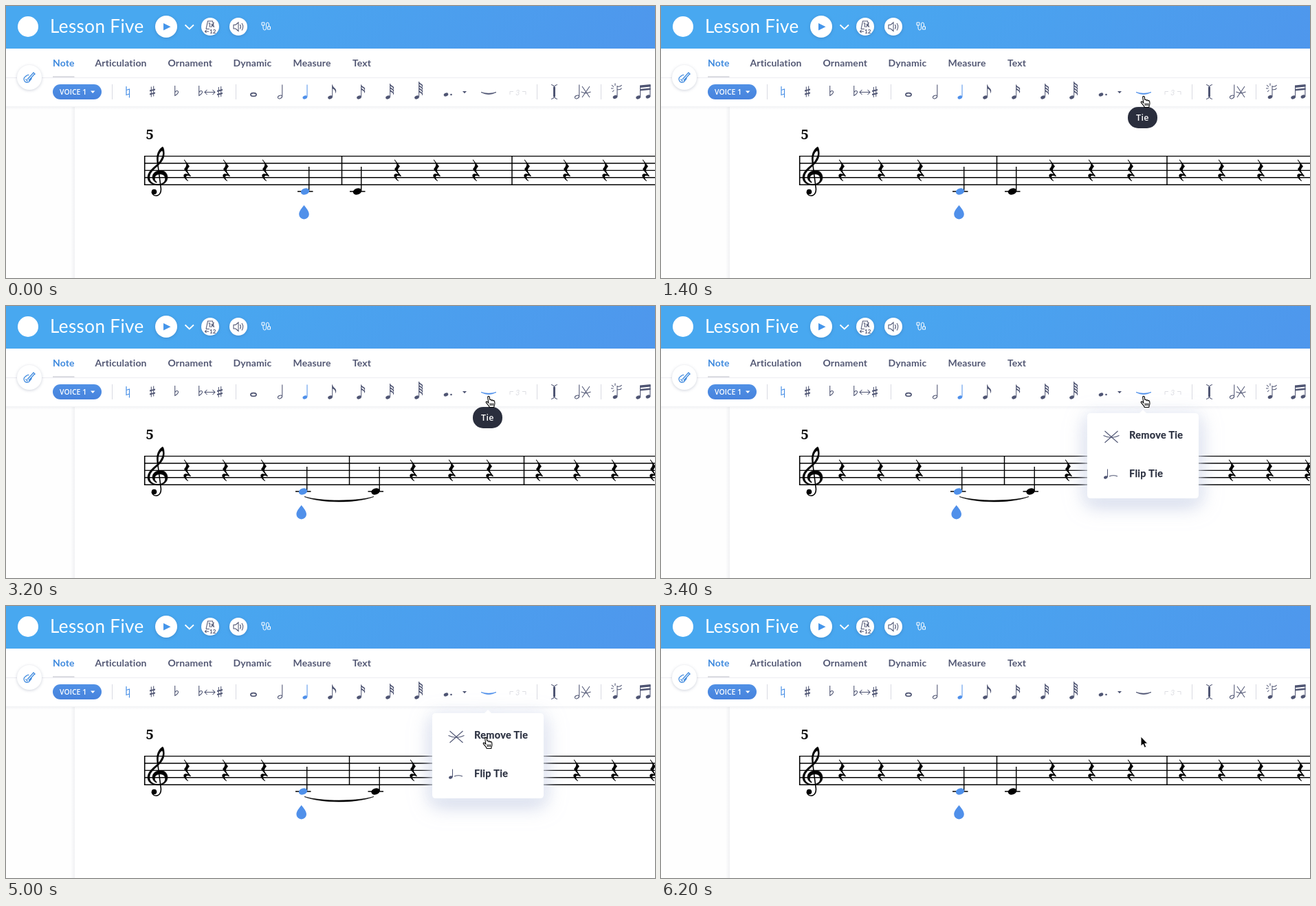
An HTML page that plays this animation: 944 px wide and 396 px high, repeating every 6.4 s.

```html
<!DOCTYPE html>
<html lang="en">
<head>
<meta charset="utf-8">
<title>Score editor</title>
<style>
  html, body { margin: 0; width: 100%; height: 100%; overflow: hidden; background: #fff; }
  svg { display: block; width: 944px; height: 396px; }
  text { font-family: Lato, "Open Sans", sans-serif; }
  .tabs text { font-size: 14px; font-weight: 700; letter-spacing: .13px; fill: #535874; }
  .tabs .on { fill: #3f8ade; }
  .open { font-family: "Open Sans", sans-serif; font-weight: 600; fill: #fff; }
  .ink { fill: #4f5573; stroke: none; }
  .line { fill: none; stroke: #4f5573; stroke-width: 1.05; }
  .thin { fill: none; stroke: #fff; stroke-width: 1; }
  .item { font-size: 14.5px; font-weight: 700; letter-spacing: .33px; fill: #2b3040; stroke: #2b3040; stroke-width: .25px; }
  .soft { filter: drop-shadow(0 1px 2px rgba(30, 50, 90, .22)); }
  .panel { filter: drop-shadow(0 1px 8px rgba(240, 243, 250, .95)) drop-shadow(0 8px 13px rgba(176, 188, 218, .65)); }
</style>
</head>
<body>
<svg viewBox="0 0 944 396">
  <defs>
    <linearGradient id="sky" gradientUnits="userSpaceOnUse" x1="420" y1="-200" x2="900" y2="200">
      <stop offset="0" stop-color="#48a8f0"/><stop offset="1" stop-color="#4f95ec"/>
    </linearGradient>
    <linearGradient id="pill" x2="0" y2="1">
      <stop offset="0" stop-color="#5090e5"/><stop offset="1" stop-color="#4783dd"/>
    </linearGradient>
    <linearGradient id="edge">
      <stop offset="0" stop-color="#1e2d50" stop-opacity="0"/><stop offset="1" stop-color="#1e2d50" stop-opacity=".06"/>
    </linearGradient>
    <linearGradient id="fall" x2="0" y2="1">
      <stop offset="0" stop-color="#1e2d50" stop-opacity=".06"/><stop offset="1" stop-color="#1e2d50" stop-opacity="0"/>
    </linearGradient>
    <path id="rest" d="M-3.5-15.5 4-5.5C1-2 .5 0 1 1 1.5 3 4 6 6 8.5L5.2 9.2C2 7.5-1 7.8-1 10-1 12 .5 14 2.2 15.6L1.5 16C-2 13.5-5.5 9.5-4.5 7-3.8 5-1 5 2 6L-4-1.5C-1-5-.2-7.5-1-9.5-1.5-11.5-3.5-13.5-4.2-15Z"/>
    <g id="sharp">
      <path class="line" d="M-1.7-7V8M1.7-8V7"/>
      <path class="ink" d="M-4-2 4-4V-2.1L-4-.1ZM-4 3 4 1V2.9L-4 4.9Z"/>
    </g>
    <path id="flat" class="line" d="M-2.3-9V5.5C2.5 3 3.6-.5 1.6-1.3 .3-1.8-1.3-.8-2.3 .6"/>
  </defs>

  <!-- page -->
  <rect y="147" width="100" height="249" fill="#fefefe"/>
  <rect x="94" y="147" width="6" height="249" fill="url(#edge)"/>
  <rect y="146" width="944" height="5" fill="url(#fall)"/>

  <!-- header -->
  <rect width="944" height="62" fill="url(#sky)"/>
  <circle cx="32" cy="30" r="15" fill="#fff"/>
  <text x="64" y="39" font-size="26" letter-spacing=".4" fill="#fff">Lesson Five</text>
  <g class="soft" fill="#fff">
    <circle cx="233" cy="30" r="16"/><circle cx="297" cy="30" r="13"/><circle cx="338" cy="30" r="13"/>
  </g>
  <path d="M229 25 239.5 30.2 229 35.5Z" fill="#4595ea"/>
  <path class="thin" style="stroke-width:1.8" d="M260.5 27.5 266.8 33.5 273 27.5"/>
  <g class="line">
    <path d="M291 33.5 293.5 22H300.5L302.5 31M291 33.5H296M294.5 25H296.5V31M298 31 302.5 24M298.5 26 301.5 30M295 37H289.5M291.5 35 289.5 37 291.5 39"/>
    <path d="M331 27.5H334L338 24V36.5L334 33H331ZM340.5 27Q342.5 30.2 340.5 33.5M343 25Q346.5 30.2 343 35.5"/>
  </g>
  <text x="296" y="39.5" font-size="8" font-weight="700" fill="#4f5573">12</text>
  <path class="thin" d="M372 24H376V28H372ZM374 28V32Q374 35 376.2 35 378.5 35 378.5 32V27Q378.5 24 380.5 24 382.5 24 382.5 27V30M380.5 30H384.5V34H380.5Z"/>

  <!-- tabs -->
  <path d="M0 104.5H944" stroke="#ececf1"/>
  <path d="M68 103H99.5" stroke="#dcdde2" stroke-width="2"/>
  <g class="tabs">
    <text x="68" y="88" class="on">Note</text><text x="129.5" y="88">Articulation</text>
    <text x="235.5" y="88">Ornament</text><text x="330.5" y="88">Dynamic</text>
    <text x="417.5" y="88">Measure</text><text x="504" y="88">Text</text>
  </g>
  <circle class="soft" cx="34" cy="104" r="18" fill="#fff"/>
  <g fill="none" stroke="#3f8ade" stroke-width="1.3">
    <path d="M33.5 100.5C30.5 99.5 29.5 102 28 103 25.5 104 25.5 108 27.5 110 29.5 112 33.5 111.5 34.5 109 35 107.5 38 106.5 37 104M31 107 40 97M33 108.5 42 98.5M39.5 96.5 42.5 99.5M28.5 106.5 31.5 109.5"/>
  </g>

  <!-- toolbar -->
  <rect x="68" y="114" width="71" height="22" rx="11" fill="url(#pill)"/>
  <text class="open" x="78" y="129" font-size="10.5">VOICE 1</text>
  <path d="M123 123.5H129.5L126.2 127Z" fill="#fff"/>
  <path d="M154.5 114V136M334.5 114V136M772.5 114V136M865.5 114V136" stroke="#d9dae2"/>
  <path d="M175 117V129.5L179.5 128M179.5 133.5V121L175 122.5" fill="none" stroke="#4a90e6" stroke-width="1.2"/>
  <g id="tools">
    <use href="#sharp" x="213" y="124.5"/><use href="#sharp" x="311" y="125"/>
    <use href="#flat" x="248" y="125"/><use href="#flat" x="283" y="125"/>
    <path class="line" d="M289 125.5H304M292.5 122 289 125.5 292.5 129M300.5 122 304 125.5 300.5 129"/>
    <ellipse cx="360" cy="129" rx="4" ry="2.4" class="line" style="stroke-width:1.8"/>
    <circle cx="647.5" cy="129" r="1.3" class="ink"/>
    <path class="ink" d="M664 124H670L667 127.2Z"/>
    <path class="line" d="M793 114.5Q797.5 115.5 797.5 119V131Q797.5 134.5 793 135.5M802 114.5Q797.5 115.5 797.5 119M797.5 131Q797.5 134.5 802 135.5"/>
    <path d="M797.5 118V132" stroke="#4f5573" stroke-width="3"/>
    <path class="line" d="M838 117 849 133M849 117 838 133M836.5 125Q843.5 128.5 850.5 125"/>
    <path class="line" d="M881 115 884 118M880 120H883.5M886 112.5V116M882 125 884.5 122.5M889 116V132M889 117Q894 118 895.5 115M889 121.5Q894 122.5 895.5 119.5"/>
    <path class="ink" d="M922 115.5 937.5 114V117.5L922 119ZM922 121 937.5 119.5V122L922 123.5Z"/>
    <path class="line" d="M922.6 116V133M936.9 115V132"/>
  </g>
  <path d="M733 129V124.5H738M751 124.5H756V129" fill="none" stroke="#dddee3"/>
  <text x="741" y="129.5" font-size="11" font-style="italic" fill="#dddee3">3</text>
  <path id="slur" d="M691 125.5Q702 131.5 713 125.5 702 129 691 125.5Z" stroke-width=".8"/>

  <!-- score -->
  <text x="203.5" y="194" style="font:700 20px 'Noto Serif',serif">5</text>
  <path d="M201 218.6H944M201 229H944M201 239.4H944M201 249.8H944M201 260.2H944" stroke="#000" stroke-width="1.4"/>
  <path d="M201.7 218V260.8" stroke="#000" stroke-width="1.6"/>
  <path fill-rule="evenodd" stroke="#000" stroke-width=".6" d="M228 205C222 208 218.5 217 219.5 225L220.5 230C213 236 206 242 206 249.5 206 257 213 260.8 221 260.8 229 260.8 235 256.5 235 249.5 235 243.5 230.5 239.5 225 239.5 218 239.5 213 243.5 213 249 213 253 215.5 256 219 257.2L219.4 256.4C217.3 255 216.3 253 216.3 251 216.3 247.3 219.8 244.8 224 244.8 228.5 244.8 231.6 247.5 231.6 251.5 231.6 256.5 227 259.6 221 259.6 213.5 259.6 208.8 255.5 208.8 249.5 208.8 243 215 238 221.5 232 227 227 230.2 221.5 230.2 215 230.2 210.5 229.6 207 228 205ZM221.8 228.5C220.5 220 222.5 213 227 210.5 229 212 228.7 216.5 226.8 220.5 225.5 223.5 223.8 226.3 221.8 228.5Z"/>
  <path d="M220.2 226 225.3 265C226.2 272.5 222.5 276.2 218.5 276.2 215 276.2 212.5 274 212.3 271" fill="none" stroke="#000" stroke-width="1.6"/>
  <circle cx="215.5" cy="270.5" r="3.8"/>
  <g id="plain"></g>
  <g id="tied"></g>
  <path id="drop" d="M0-11C3-7 7.3-2.5 7.3 2.2A7.3 7.3 0 0 1-7.3 2.2C-7.3-2.5-3-7 0-11Z" fill="#5090ea"/>

  <!-- overlays -->
  <g id="tip">
    <rect x="679" y="147" width="43" height="31" rx="15" fill="#2a2e3d"/>
    <text class="open" x="700.5" y="167" font-size="12.5" letter-spacing=".4" text-anchor="middle">Tie</text>
  </g>
  <g id="menu">
    <path class="panel" fill="#fff" d="M625 156H696L701 151 706 156H777Q782 156 782 161V275Q782 280 777 280H625Q620 280 620 275V161Q620 156 625 156Z"/>
    <path class="line" d="M645.5 182 664.5 199M664.5 182 645.5 199M643.5 188.5Q655 194.500 666.500 188.5"/>
    <ellipse cx="646.800" cy="249.500" rx="2.800" ry="2" class="ink" transform="rotate(-20 646.800 249.500)"/>
    <path class="line" d="M649.500 237.500V249M652 248Q658 245.500 664 248"/>
    <text class="item" x="681" y="193">Remove Tie</text>
    <text class="item" x="681" y="249">Flip Tie</text>
  </g>
  <path id="arrow" d="M0 0V14L3.2 11.2 5.4 16.2 7.8 15.2 5.7 10.3H9.8Z" fill="#000" stroke="#fff"/>
  <g id="hand" stroke="#000" stroke-width="1.1">
    <path fill="#fff" d="M3.2 1.6C3.2 0 5.6 0 5.8 1.6L6.4 6C6.6 5 8.4 5 8.7 6.4 9 5.6 10.7 5.7 11 7 11.4 6.4 13 6.6 13.2 8L13.4 11C13.4 13 12.3 14 12.2 16.5H5.8C5.5 14.5 3 12.5 .9 9.6 .2 8.4 1.6 7.6 2.8 8.6L4.3 10Z"/>
    <path d="M6.8 10.5V14M8.9 10.5V14M11 10.5V14"/>
  </g>
</svg>
<script>
const BLUE = '#4f90ea', INK = '#4f5573', LOOP = 6400, STEP = 200;
const $ = id => document.getElementById(id);
const add = (id, markup) => $(id).insertAdjacentHTML('beforeend', markup);

// Toolbar notes
const head = (x, y, fill) =>
  `<ellipse cx="${x}" cy="${y}" rx="3.4" ry="2.4" transform="rotate(-22 ${x} ${y})" fill="${fill}"/>`;
const flag = (x, y, h) =>
  `<path class="ink" d="M${x} ${y}c.5 ${h * .3} 6 ${h * .45} 5.5 ${h * .7}c0 ${h * .15} -.6 ${h * .2} -1.3 ${h * .3}c.8 ${-h * .3} -1 ${-h * .45} -4.2 ${-h * .55}z"/>`;

function tool(x, top, flags = 0, color = INK) {
  const sx = x + 3.2;
  let s = head(x, 133, color) + `<path d="M${sx} ${top}V132.5" stroke="${color}"/>`;
  for (let i = 0; i < flags; i++) s += flag(sx, top + i * 4, flags > 1 ? 8.5 : 13);
  add('tools', s);
}
function half(x) {
  add('tools', `<ellipse cx="${x}" cy="132.5" rx="3.2" ry="2.1" class="line" transform="rotate(-25 ${x} 132.5)"/>
    <path class="line" d="M${x + 3.3} 114.5V131.5"/>`);
}
half(398.5);
half(830.5);
tool(434.8, 114.5, 0, BLUE);
tool(471.5, 114.5, 1);
tool(513.5, 114.5, 2);
tool(555.5, 113, 3);
tool(597.5, 110, 4);
add('tools', head(640, 129, INK) + head(886, 132.5, INK) + head(919.6, 133, INK) + head(933.9, 132, INK));

// Two spacings of the same measures
const rest = (x, id = '') => `<use ${id} href="#rest" x="${x}" y="239"/>`;
const bar = x => `<path d="M${x} 218V260.8" stroke="#000" stroke-width="1.5"/>`;
const note = (x, cls = '') => `<path d="M${x - 11} 270H${x + 11.5}M${x + 5.7} 234V269" stroke="#000" stroke-width="1.4"/>
  <ellipse class="${cls}" cx="${x}" cy="270" rx="6.3" ry="4.5" transform="rotate(-18 ${x} 270)"/>`;

add('plain', [263, 320, 377, 569, 626, 758, 815, 872, 930].map(x => rest(x)).join('') +
  rest(683, 'id="hot"') + bar(488.5) + bar(736) + note(435, 'pick') + note(511));
add('tied', [263, 319, 375, 592, 648, 703, 775, 830, 885, 941].map(x => rest(x)).join('') +
  bar(499.5) + bar(753.5) + note(432, 'pick') + note(537.5) +
  '<path d="M434 277.5C458 284.8 511 284.8 535 277.5 511 287.4 458 287.4 434 277.5Z" stroke="#000" stroke-width=".6"/>');

// Cues: [from ms, value]
const cues = {
  tied: [[0, false], [1800, true], [5800, false]],
  picked: [[0, true], [1800, false], [2000, true], [5800, false], [6000, true]],
  drop: [[0, 433.5], [2000, 429.7], [6000, 432], [6200, 433.5]],
  hot: [[0, false], [600, true], [1000, false]],
  slur: [[0, false], [1000, true], [5800, false]],
  tip: [[0, false], [1200, true], [3400, false]],
  menu: [[0, false], [3400, true], [5800, false]],
  cursor: [[0, null],
    [200, ['arrow', 785, 300]], [400, ['arrow', 750, 273]], [600, ['arrow', 689, 238]], [800, ['arrow', 707, 145]],
    [1000, ['hand', 697.5, 131]], [4200, ['hand', 697, 150]], [4400, ['hand', 695, 177]], [4600, ['hand', 693.5, 191]],
    [5800, ['arrow', 698, 190]]]
};
const at = (key, t) => cues[key].filter(c => c[0] <= t).pop()[1];
const show = (id, on) => { $(id).style.display = on ? '' : 'none'; };
const place = (id, x, y) => $(id).setAttribute('transform', `translate(${x} ${y})`);
const picks = document.querySelectorAll('.pick');

function draw(t) {
  const tied = at('tied', t), cursor = at('cursor', t);
  show('tied', tied);
  show('plain', !tied);
  show('tip', at('tip', t));
  show('menu', at('menu', t));
  picks.forEach(p => p.setAttribute('fill', at('picked', t) ? BLUE : '#000'));
  $('hot').setAttribute('fill', at('hot', t) ? BLUE : '#000');
  for (const a of ['fill', 'stroke']) $('slur').setAttribute(a, at('slur', t) ? BLUE : INK);
  place('drop', at('drop', t), 301);
  for (const id of ['arrow', 'hand']) show(id, cursor && cursor[0] === id);
  if (cursor) place(...cursor);
}

const start = performance.now();
function tick() {
  const t = (performance.now() - start) % LOOP;
  draw(Math.floor(t / STEP) * STEP);
  requestAnimationFrame(tick);
}
tick();
</script>
</body>
</html>
```
